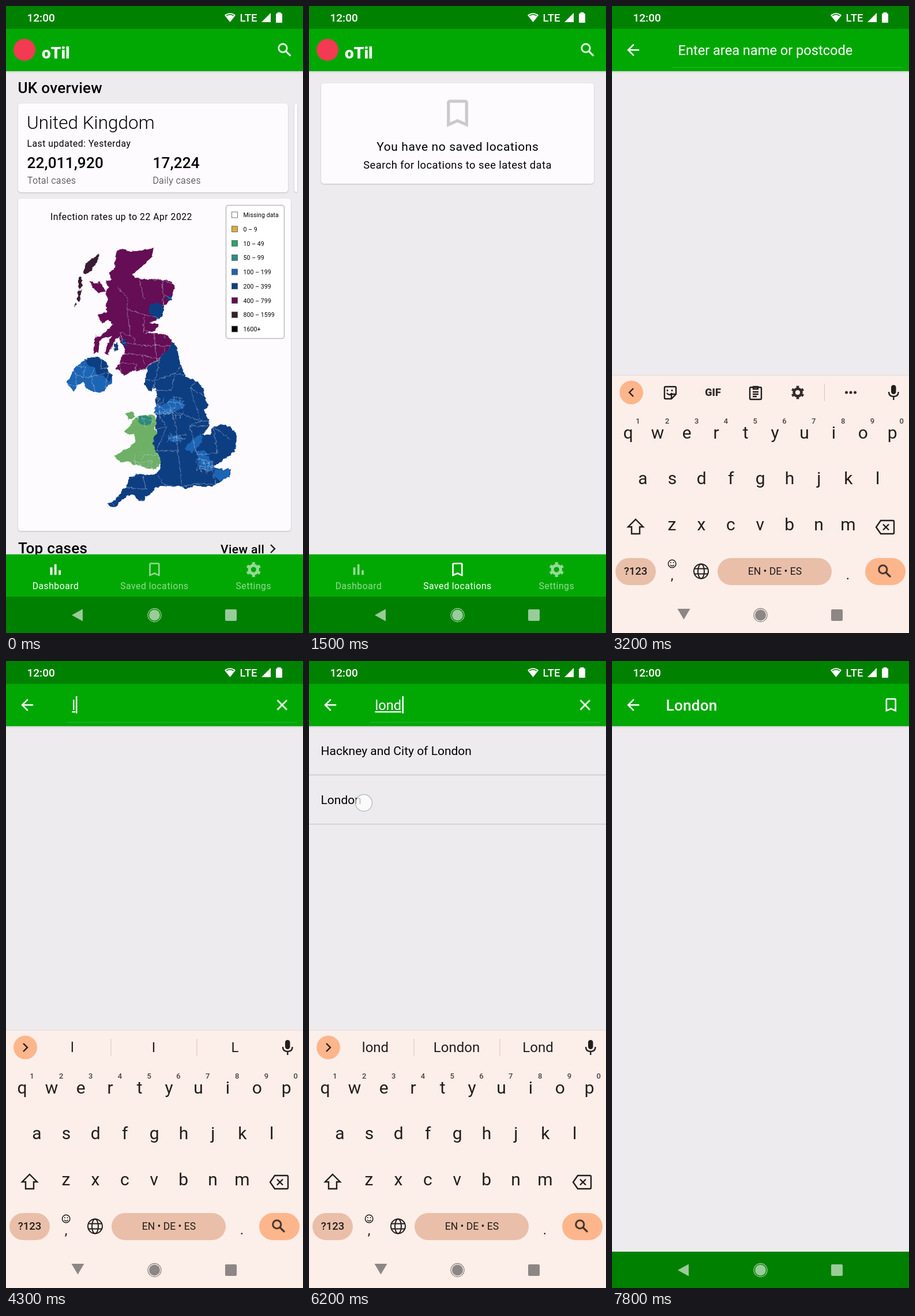
Recreate the animation shown at these times as an HTML page. Size 515 by 1087 pixels, loop 8000 ms.

```html
<!DOCTYPE html>
<html lang="en">
<head>
<meta charset="utf-8">
<title>Case tracker</title>
<style>
html, body { margin: 0; width: 100%; height: 100%; overflow: hidden; background: #edebee; }
svg.stage { display: block; width: 100vw; height: 100vh; }
text { font-family: Roboto, sans-serif; white-space: pre; }
.mid { text-anchor: middle; }
.white { fill: #fff; }
.card { fill: #fdfbfe; filter: drop-shadow(0 1px 1px #0003); }
.head { font-size: 26.2px; font-weight: 500; letter-spacing: .2px; }
.body { font-size: 15.73px; letter-spacing: .52px; }
.note { font-size: 15.73px; letter-spacing: .52px; font-weight: 300; fill: #222; }
.tab { font-size: 15.73px; letter-spacing: .52px; text-anchor: middle; }
.input { font-size: 23.6px; fill: #fff; }
.row { font-size: 21px; }
.key { font-size: 30px; text-anchor: middle; fill: #221d1b; }
.digit { font-size: 13px; text-anchor: middle; fill: #4a3f3b; font-weight: 500; }
.word { font-size: 24px; text-anchor: middle; fill: #221d1b; }
.legend { font-size: 10.49px; letter-spacing: .1px; }
.line { fill: none; stroke: #221d1b; stroke-width: 2.4; }
.border { fill: none; stroke: #c3cce6; stroke-width: .7; stroke-opacity: .75; }
.pop { fill: #fff; filter: drop-shadow(0 2px 3px #0004); }
</style>
</head>
<body>
<svg class="stage" viewBox="0 0 515 1087" preserveAspectRatio="none">
<defs>
  <symbol id="search" viewBox="0 0 24 24"><circle cx="9.5" cy="9.5" r="5.5" fill="none" stroke="currentColor" stroke-width="2"/><path d="M14 14l5.7 5.7" stroke="currentColor" stroke-width="2.2"/></symbol>
  <symbol id="back" viewBox="0 0 24 24"><path d="M20 11H7.8l5.6-5.6L12 4l-8 8 8 8 1.4-1.4L7.8 13H20z" fill="currentColor"/></symbol>
  <symbol id="close" viewBox="0 0 24 24"><path d="M5.7 5.7l12.6 12.6M18.3 5.7L5.7 18.3" stroke="currentColor" stroke-width="2"/></symbol>
  <symbol id="mark" viewBox="0 0 24 24"><path d="M17 3H7c-1.1 0-2 .9-2 2v16l7-3 7 3V5c0-1.1-.9-2-2-2zm0 15l-5-2.2L7 18V5h10z" fill="currentColor"/></symbol>
  <symbol id="chart" viewBox="0 0 24 24"><path d="M5 9.2h3V19H5zM10.6 5h2.8v14h-2.8zM16.2 13H19v6h-2.8z" fill="currentColor"/></symbol>
  <symbol id="gear" viewBox="0 0 24 24"><g fill="none" stroke="currentColor"><circle cx="12" cy="12" r="5.5" stroke-width="4"/><circle cx="12" cy="12" r="8.2" stroke-width="3.2" pathLength="12" stroke-dasharray=".9 1.1" stroke-dashoffset="-.55"/></g></symbol>
  <filter id="rough" x="-5%" y="-5%" width="110%" height="110%" color-interpolation-filters="sRGB">
    <feTurbulence type="fractalNoise" baseFrequency=".16" numOctaves="2" seed="4"/>
    <feDisplacementMap in="SourceGraphic" scale="6" xChannelSelector="R" yChannelSelector="G"/>
  </filter>
  <path id="scotland" d="M256 420L252 437 235 452 221 464 223 471 237 474 262 473 287 478 293 488 288 504 281 514 272 520 272 534 262 543 249 549 266 553 258 563 240 568 262 567 281 572 287 581 283 596 270 606 261 615 247 622 243 630 230 631 214 636 203 641 198 632 191 629 198 614 206 600 205 591 199 583 197 574 190 578 182 592 178 605 172 603 175 588 183 572 170 576 154 578 176 562 186 551 177 545 165 551 159 535 176 531 172 517 178 508 171 498 178 488 172 477 184 475 178 462 188 455 189 440 192 424 203 422 215 426 232 424Z"/>
  <path id="england" d="M287 581L297 592 300 612 307 632 312 643 330 650 341 661 345 680 351 693 343 700 350 716 353 727 347 738 341 744 355 742 358 730 372 725 390 730 400 745 399 765 390 778 378 786 366 795 360 800 375 803 391 803 388 815 372 824 358 833 325 832 312 838 303 832 290 834 270 832 257 836 253 845 242 851 240 858 232 860 222 848 210 848 203 855 192 866 184 870 176 864 190 855 200 843 210 830 214 818 228 811 248 813 260 812 266 803 268 795 266 780 256 768 255 750 262 738 257 724 262 713 256 705 265 698 258 690 262 672 258 662 248 668 240 655 243 640 247 623 262 615 272 604 283 595Z"/>
  <path id="wales" d="M222 716L240 708 258 710 262 722 257 730 262 740 255 750 257 768 267 782 268 794 258 803 245 802 235 798 220 796 212 788 200 792 187 781 202 772 212 766 224 756 223 742 212 743 205 737 216 728ZM207 706L220 703 223 712 212 716Z"/>
  <path id="ulster" d="M137 612L158 609 166 612 175 619 176 632 184 640 184 654 175 660 165 671 150 668 140 664 135 652 125 656 118 669 104 652 110 645 116 632 125 622Z"/>
  <clipPath id="in-scotland"><use href="#scotland"/></clipPath>
  <clipPath id="in-england"><use href="#england"/></clipPath>
  <clipPath id="in-wales"><use href="#wales"/></clipPath>
  <clipPath id="in-ulster"><use href="#ulster"/></clipPath>
  <linearGradient id="shade" x2="0" y2="1"><stop stop-color="#000" stop-opacity=".1"/><stop offset="1" stop-color="#000" stop-opacity="0"/></linearGradient>
  <g id="keys-nav"><circle cx="257.500" cy="1056" r="9.500"/><circle cx="257.500" cy="1056" r="11.500" fill="none" stroke="currentColor" stroke-width="1.300"/><rect x="380" y="1046" width="20" height="20" rx="2"/></g>
  <path id="left" d="M114 1056L133 1045.500V1066.500Z"/>
</defs>

<rect width="515" height="1087" fill="#edebee"/>
<rect y="113" width="515" height="4" fill="url(#shade)"/>
<rect y="39" width="515" height="74" fill="#01a803"/>

<g data-move="0:0,0 2800:-74,0 2900:-258,0 3000:-440,0 3100:-515,0">
  <g id="dashboard" data-fade="0:1 1300:.6 1400:.12 1500:0">
    <text class="head" x="20.500" y="151">UK overview</text>
    <rect class="card" x="21" y="169" width="468" height="154" rx="5"/>
    <path class="card" d="M505 169.500h-2q-3 0-3 4v145q0 4 3 4h2z"/>
    <text x="36" y="213" font-size="31.500" font-weight="300">United Kingdom</text>
    <text class="body" x="36.500" y="244">Last updated: Yesterday</text>
    <text class="head" x="36.500" y="281">22,011,920</text><text class="head" x="254.500" y="281">17,224</text>
    <text class="note" x="37" y="308">Total cases</text><text class="note" x="254.500" y="308">Daily cases</text>
    <rect class="card" x="21" y="334" width="473" height="576" rx="5"/>
    <text class="body" x="77" y="371">Infection rates up to 22 Apr 2022</text>
    <rect x="381.500" y="345.500" width="101" height="231" rx="4" fill="#fff" stroke="#bbb" stroke-width="1.500"/>
    <g id="legend"></g>
    <g id="map" filter="url(#rough)">
      <path fill="#3a1c32" d="M161 430L158 445 148 458 140 465 134 462 138 447 150 437ZM126 472L131 470 132 486 126 491ZM125 494L131 492 128 512 123 510ZM117 522L121 515 123 519Z"/>
      <path fill="#650d55" d="M145 475L158 482 162 477 173 495 160 497 150 488ZM155 570L162 585 160 600 152 602ZM172 566L164 577 159 588 158 576Z"/>
      <use href="#scotland" fill="#650d55"/>
      <use href="#england" fill="#0d3e82"/>
      <use href="#wales" fill="#6eb066"/>
      <use href="#ulster" fill="#1c65b4"/>
      <g fill="#0d3e82">
        <path d="M249 518L262 514 273 520 273 536 262 543 254 539 246 529ZM187 586L193 584 195 596 188 599ZM200 576L207 578 212 592 203 587ZM279 502h8v7h-8z"/>
        <path d="M137 612L158 609 175 619 176 632 184 641 179 652 168 640 158 641 154 628 140 622Z"/>
      </g>
      <g fill="#1c65b4">
        <path d="M257 694L274 690 288 680 308 686 308 698 292 703 282 708 258 708ZM310 768L326 748 338 742 341 755 322 775ZM330 772L344 770 352 784 361 797 352 807 336 802ZM362 804L391 802 386 816 372 823 360 815ZM280 745L300 744 304 755 284 755Z"/>
      </g>
      <path fill="#2e8b78" d="M229 711L242 709 252 713 252 725 240 727 230 722Z"/>
    </g>
    <text class="head" x="21" y="949">Top cases</text>
    <text x="372" y="949" font-size="21" font-weight="500" letter-spacing=".4">View all</text>
    <path class="line" d="M459 934l7 7-7 7"/>
  </g>
  <g data-fade="0:0 1300:.1 1400:.6 1500:1">
    <rect class="card" x="21" y="134" width="473" height="174" rx="5"/>
    <use href="#mark" x="226" y="154.500" width="63" height="63" color="#cbc9cc"/>
    <text class="mid" x="257.800" y="251" font-size="21" letter-spacing=".6">You have no saved locations</text>
    <text class="mid" x="257.500" y="282" font-size="18.360" letter-spacing=".45">Search for locations to see latest data</text>
  </g>
  <circle cx="32" cy="76" r="19" fill="#f23a52"/>
  <text class="white" x="62" y="91" font-size="28" font-weight="900">oTil</text>
  <use href="#search" x="467.500" y="60.500" width="31.500" height="31.500" color="#fff"/>
  <rect y="950.600" width="515" height="74" fill="#01a803"/>
  <g class="white" color="#fff">
    <g data-fade="0:1 1300:.58"><use href="#chart" x="70" y="961.300" width="31.500" height="31.500"/><text class="tab" x="86" y="1011">Dashboard</text></g>
    <g data-fade="0:.58 1300:1"><use href="#mark" x="241.700" y="961.300" width="31.500" height="31.500"/><text class="tab" x="257.500" y="1011">Saved locations</text></g>
    <g opacity=".58"><use href="#gear" x="413.500" y="961.300" width="31.500" height="31.500"/><text class="tab" x="429.300" y="1011">Settings</text></g>
  </g>
</g>

<g data-move="0:515,0 2800:441,0 2900:257,0 3000:75,0 3100:0,0 6600:-7,0 6700:-109,0 6800:-285,0 6900:-452,0 7000:-515,0">
  <use href="#back" x="21" y="60.500" width="31.500" height="31.500" color="#fff"/>
  <path d="M105 106.500H504" stroke="#2cb92e"/>
  <text class="input" x="114.500" y="85" data-fade="0:1 4000:0">Enter area name or postcode</text>
  <use href="#close" x="463" y="60.500" width="31.500" height="31.500" color="#fff" data-fade="0:0 4000:1"/>
  <g id="typed"></g>
  <g id="results"></g>
</g>

<g data-move="0:515,0 6600:508,0 6700:406,0 6800:230,0 6900:63,0 7000:0,0" color="#fff">
  <use href="#back" x="21" y="60.500" width="31.500" height="31.500"/>
  <text class="head white" x="93.500" y="86">London</text>
  <use href="#mark" x="468" y="60.500" width="31.500" height="31.500"/>
</g>

<rect width="515" height="39.600" fill="#008200"/>
<g class="white">
  <text x="36.500" y="27" font-size="19" font-weight="500">12:00</text>
  <text x="405.500" y="27" font-size="18.500" font-weight="500">LTE</text>
  <path d="M379 16q9.500-7.500 19 0L388.500 28Z"/><path d="M382 17q6.500-4.500 13 0" fill="none" stroke="#008200" stroke-width="1.500"/>
  <path d="M459 12V28H443Z"/>
  <path d="M470.500 13V11h6v2h1.500q1 0 1 1V28q0 1-1 1h-9q-1 0-1-1V14q0-1 1-1z"/>
</g>
<rect y="1024" width="515" height="63" fill="#008000"/>
<g fill="#98cc98" color="#98cc98"><use href="#left"/><use href="#keys-nav"/></g>

<g id="keyboard" data-move="0:0,460 2700:0,170 2800:0,0 6400:0,110 6500:0,330 6600:0,460">
  <rect y="640" width="515" height="447" fill="#fceee9"/>
  <rect y="639" width="515" height="2" fill="#e9e2e2"/>
  <circle cx="33.500" cy="670" r="20.500" fill="#fdb68b"/>
  <path class="line" d="M37 663l-7 7 7 7" data-fade="0:1 4000:0"/>
  <path class="line" d="M30 663l7 7-7 7" data-fade="0:0 4000:1"/>
  <g data-fade="0:1 4000:0" color="#332c2a">
    <path class="line" d="M93 660h16q2 0 2 2v11l-8 8h-10q-2 0-2-2v-17q0-2 2-2zM111 673h-6q-2 0-2 2v6M95 671q5 6 9 0M96 665v3M104 665v3"/>
    <text class="mid" x="175" y="676" font-size="18" font-weight="900" fill="#332c2a">GIF</text>
    <path class="line" d="M241 661h16q2 0 2 2v17q0 2-2 2h-16q-2 0-2-2v-17q0-2 2-2zM245 660h8v4h-8zM244 669h10M244 673h10M244 677h7"/>
    <use href="#gear" x="308" y="656" width="28" height="28"/>
    <path d="M368.500 655V685" stroke="#d5c5bf"/>
    <g fill="#332c2a"><circle cx="406.500" cy="670" r="2.500"/><circle cx="414" cy="670" r="2.500"/><circle cx="421.500" cy="670" r="2.500"/></g>
  </g>
  <rect x="484" y="657" width="8.500" height="16" rx="4.200" fill="#221d1b"/>
  <path class="line" d="M480 669q0 8 8.300 8t8.300-8M488.300 677v6"/>
  <g id="keys"></g>
  <path class="line" d="M41 890l13 13h-6v12h-14v-12h-6z"/>
  <path class="line" d="M466 892h21q2 0 2 2v19q0 2-2 2h-21l-8-11.500zM470 898.500l10 10M480 898.500l-10 10"/>
  <g fill="#e9bfaa"><rect x="6" y="957" width="70" height="47" rx="23.500"/><rect x="183" y="957" width="198" height="47" rx="23.500"/><rect x="439" y="957" width="70" height="47" rx="23.500" fill="#fdb68b"/></g>
  <g fill="#221d1b" class="mid">
    <text x="41" y="986" font-size="18.500" font-weight="500">?123</text>
    <text x="282.500" y="986" font-size="17.500">EN • DE • ES</text>
    <text x="104" y="995" font-size="24">,</text><text x="409" y="994" font-size="24">.</text>
  </g>
  <path class="line" style="stroke-width:1.500" d="M97.500 967a6.700 6.700 0 1 0 13.400 0a6.700 6.700 0 1 0-13.400 0M101 969q3.300 3.500 6.600 0M101.800 964v2M106.600 964v2"/>
  <g class="line" style="stroke-width:2"><circle cx="154.500" cy="980" r="12.500"/><ellipse cx="154.500" cy="980" rx="5.500" ry="12.500"/><path d="M143 975.500h23M143 984.500h23"/></g>
  <use href="#search" x="457.500" y="964.500" width="31" height="31" color="#221d1b"/>
  <g fill="#8d8684" color="#8d8684">
    <use href="#left" data-fade="0:1 3200:0"/>
    <path d="M113.500 1045H135.500L124.500 1063.500Z" data-fade="0:0 3200:1"/>
    <use href="#keys-nav"/>
  </g>
</g>
<g id="taps"></g>
</svg>

<script>
const LOOP = 8000;
const add = (id, markup) => document.getElementById(id).insertAdjacentHTML('beforeend', markup);
const during = (from, to = LOOP) => `data-fade="0:0 ${from}:1${to < LOOP ? ` ${to}:0` : ''}"`;

// Map legend and district borders
const bands = { 'Missing data': '#fff', '0 – 9': '#dcac3c', '10 – 49': '#27a567', '50 – 99': '#2f8c80', '100 – 199': '#1c65b4',
  '200 – 399': '#0d3e82', '400 – 799': '#650d55', '800 – 1599': '#351f2a', '1600+': '#000' };
Object.entries(bands).forEach(([label, color], i) => {
  const y = 362 + 24.75 * i;
  add('legend', `<rect x="391.500" y="${y - 5}" width="10" height="10" fill="${color}" stroke="#555" stroke-width=".8"/>
    <text class="legend" x="411.500" y="${y + 4}">${label}</text>`);
});

let seed = 7;
const random = () => (seed = seed * 16807 % 2147483647) / 2147483647;

function borders(land, x, y, cols, rows, step) {
  const points = Array.from({ length: rows + 1 }, (_, r) => Array.from({ length: cols + 1 }, (_, c) =>
    [x + (c + (random() - .5) * .8) * step, y + (r + (random() - .5) * .8) * step]));
  let d = '';
  for (let r = 0; r < rows; r++) for (let c = 0; c < cols; c++) {
    for (const next of [points[r][c + 1], points[r + 1][c]])
      if (random() < .72) d += `M${points[r][c]}L${next}`;
  }
  add('map', `<path class="border" clip-path="url(#in-${land})" d="${d}"/>`);
}
borders('scotland', 205, 476, 3, 3, 30);
borders('scotland', 200, 568, 5, 4, 19);
borders('england', 170, 580, 8, 10, 32);
borders('england', 256, 680, 6, 4, 9);
borders('england', 332, 786, 5, 4, 6);
borders('england', 282, 742, 4, 2, 7);
borders('wales', 225, 778, 5, 3, 10);
borders('wales', 226, 706, 4, 2, 13);
borders('ulster', 100, 606, 5, 4, 18);

// Keyboard
const keys = {};
[['qwertyuiop', 28, 741], ['asdfghjkl', 53.5, 820], ['zxcvbnm', 104, 900]].forEach(([letters, x0, y], row) => {
  [...letters].forEach((letter, i) => {
    const x = x0 + 50.9 * i;
    keys[letter] = { x, y };
    add('keys', `<text class="key" x="${x}" y="${y + 9}">${letter}</text>`);
    if (!row) add('keys', `<text class="digit" x="${45 + 50.8 * i}" y="724">${(i + 1) % 10}</text>`);
  });
});

const suggest = (from, to, words) => add('keys', `<g ${during(from, to)}>
  <path d="M182 655V685M331 655V685" stroke="#d5c5bf"/>
  ${words.map((word, i) => `<text class="word" x="${115 + 141 * i}" y="678">${word}</text>`).join('')}</g>`);
suggest(4000, 4500, ['l', 'I', 'L']);
suggest(4500, 4900, ['lo', 'look', 'Lo']);
suggest(4900, 5200, ['lon', 'lond', 'Lon']);
suggest(5200, LOOP, ['lond', 'London', 'Lond']);

const tap = (x, y, from, to) => add('taps',
  `<circle cx="${x}" cy="${y}" r="14.500" fill="#fff" fill-opacity=".75" stroke="#8889a0" stroke-opacity=".5" stroke-width="1.500" ${during(from, to)}/>`);

function press(letter, from, to) {
  const { x, y } = keys[letter];
  add('keyboard', `<g ${during(from, to)}>
    <rect x="${x - 14}" y="${y - 20}" width="28" height="38" fill="#fceee9" opacity=".6"/>
    <circle class="pop" cx="${x}" cy="${y - 78}" r="39"/>
    <text class="key" style="font-size:40px" x="${x}" y="${y - 65}">${letter}</text></g>`);
  tap(x - 16, y + 22, from, from + 100);
}
press('l', 3900, 4200);
press('o', 4400, 4600);
press('n', 4800, 4900);
press('d', 5100, 5300);
tap(257, 995, 1200, 1400);
tap(478, 82, 2600, 2700);
tap(95, 246, 6200, 6400);

// Search field
const cursor = (x, from, to) => add('typed', `<rect class="white" x="${x}" y="61" width="2.500" height="30" ${during(from, to)}/>`);
const type = (word, from, to, decoration = 'underline') => add('typed',
  `<text class="input" x="114.500" y="85" style="text-decoration:${decoration} 1px;text-underline-offset:3px" ${during(from, to)}>${word}</text>`);
type('l', 4000, 4500);
type('lo', 4500, 4900);
type('lon', 4900, 5200);
type('lond', 5200, 6400);
type('lond', 6400, LOOP, 'none');
cursor(115, 3700, 4000);
cursor(121, 4000, 4500);
cursor(135, 4500, 4900);
cursor(148, 4900, 5200);
cursor(161.5, 5200, 5700);
cursor(161.5, 6200, 6400);

// Search results
const row = (name, index, attributes) => add('results', `<g ${attributes}>
  <text class="row" x="20.500" y="${163 + 85.3 * index}">${name}</text>
  <path d="M0 ${197.5 + 85.3 * index}H515" stroke="#c8c6c9" stroke-width="1.300"/></g>`);
['East Lothian', 'Gloucester', 'Gloucestershire', , 'Hounslow', 'Midlothian', 'Slough']
  .forEach((name, i) => row(name, i, during(4600, 5100)));
row('Hackney and City of London', 0, `${during(4600)} data-move="0:0,256 5200:0,170 5300:0,35 5400:0,0"`);
row('London', 1, 'data-fade="0:0 5200:.2 5300:.7 5400:1"');
add('results', '<rect y="198" width="515" height="85" data-fade="0:0 6300:.06 6500:0"/>');

// Turn "time:value" tracks into stepped keyframes
const tracks = {
  fade: value => `opacity:${value}`,
  move: value => `transform:translate(${value.split(',').map(n => n + 'px').join()})`
};
let sheet = '';
document.querySelectorAll('[data-fade],[data-move]').forEach((el, i) => {
  el.style.animation = Object.keys(tracks).filter(kind => el.dataset[kind]).map(kind => {
    const frames = el.dataset[kind].split(' ').map(stop => {
      const [time, value] = stop.split(':');
      return `${time / LOOP * 100}%{${tracks[kind](value)}}`;
    });
    sheet += `@keyframes ${kind}${i}{${frames.join('')}}`;
    return `${kind}${i} ${LOOP}ms step-end infinite`;
  }).join();
});
document.head.appendChild(document.createElement('style')).textContent = sheet;
</script>
</body>
</html>
```
